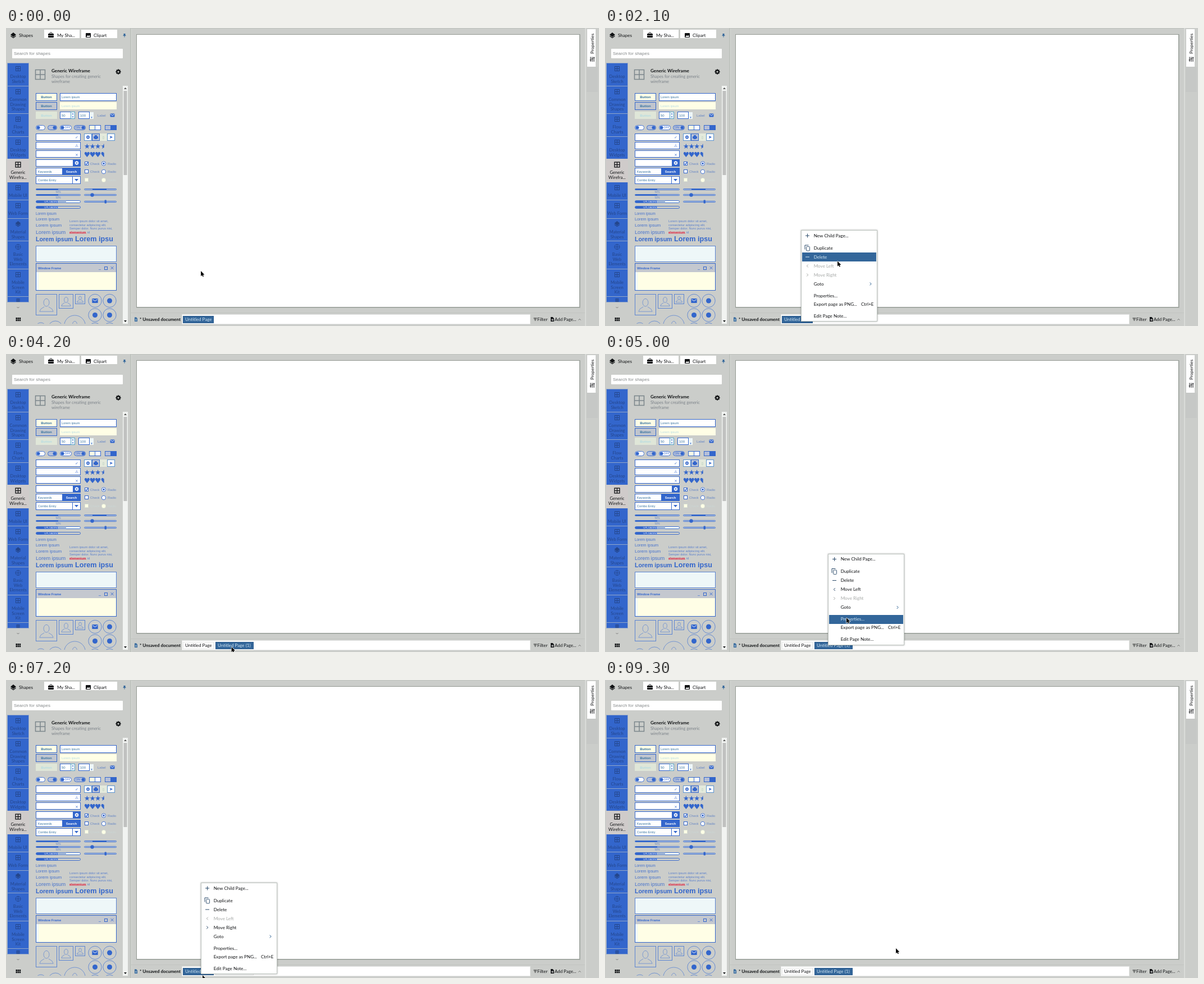
An HTML page with a canvas that plays this animation: 1056x531 px, repeating every 9.4 s.

```html
<!DOCTYPE html>
<html lang="en">
<head>
<meta charset="utf-8">
<title>Page tabs</title>
<style>
  html, body { margin: 0; width: 100%; height: 100%; overflow: hidden; background: #cbcdca; }
  canvas { display: block; }
</style>
</head>
<body>
<canvas id="stage" width="1056" height="531"></canvas>
<script>
const LOOP = 9400;
const BLUE = '#3366cc', SOFT = '#5b84d2', TEAL = '#34719f', DARK = '#24468c', STEEL = '#33669a';
const INK = '#101214', GRAY = '#cbcdca', CREAM = '#fffee6', MIST = '#eef7f8', PALE = '#b4dbe2', WHITE = '#fff';
const UI = 'Lato, sans-serif', ARIAL = '"Liberation Sans", sans-serif', SYMBOL = '"DejaVu Sans", sans-serif';

const screen = document.getElementById('stage').getContext('2d');
const backdrop = document.createElement('canvas');
backdrop.width = 1056;
backdrop.height = 531;
let ctx = screen;

// ---------- drawing helpers ----------
function rect(x, y, w, h, fill, stroke) {
  if (fill) { ctx.fillStyle = fill; ctx.fillRect(x, y, w, h); }
  if (stroke) { ctx.lineWidth = 1; ctx.strokeStyle = stroke; ctx.strokeRect(x + .5, y + .5, w - 1, h - 1); }
}
function round(x, y, w, h, r, fill, stroke, width = .9) {
  ctx.beginPath();
  ctx.roundRect(x, y, w, h, r);
  if (fill) { ctx.fillStyle = fill; ctx.fill(); }
  if (stroke) { ctx.lineWidth = width; ctx.strokeStyle = stroke; ctx.stroke(); }
}
function circle(x, y, r, fill, stroke, width) { round(x - r, y - r, 2 * r, 2 * r, r, fill, stroke, width); }
function line(color, width, ...points) {
  ctx.beginPath();
  for (let i = 0; i < points.length; i += 2) ctx.lineTo(points[i], points[i + 1]);
  ctx.strokeStyle = color;
  ctx.lineWidth = width;
  ctx.stroke();
}
function shape(fill, ...points) {
  ctx.beginPath();
  for (let i = 0; i < points.length; i += 2) ctx.lineTo(points[i], points[i + 1]);
  ctx.closePath();
  ctx.fillStyle = fill;
  ctx.fill();
}
function text(s, x, y, size, color = INK, family = UI, align = 'left', weight = '') {
  ctx.font = `${weight} ${size}px ${family}`;
  ctx.textAlign = align;
  ctx.fillStyle = color;
  ctx.fillText(s, x, y + size * .35);
}
const arial = (s, x, y, size = 5.6, color = TEAL, weight = '', align = 'left') =>
  text(s, x, y, size, color, ARIAL, align, weight);
const symbol = (s, x, y, size, color = BLUE) => text(s, x, y, size, color, SYMBOL, 'center');

// ---------- icons ----------
function gridIcon(x, y, size, color, width = 1) {
  const h = size / 2;
  ctx.strokeStyle = color;
  ctx.lineWidth = width;
  ctx.strokeRect(x - h, y - h, size, size);
  line(color, width, x, y - h, x, y + h);
  line(color, width, x - h, y, x + h, y);
}
function layersIcon(x, y, color) {
  shape(color, x, y - 5, x + 5, y - 1, x, y + 3, x - 5, y - 1);
  line(color, 1.2, x - 4.5, y + 1.2, x, y + 4.6, x + 4.5, y + 1.2);
}
function gearIcon(x, y, r, color, hole = WHITE) {
  for (let i = 0; i < 4; i++) {
    const a = i * Math.PI / 4, dx = Math.cos(a) * r, dy = Math.sin(a) * r;
    line(color, r * .45, x - dx, y - dy, x + dx, y + dy);
  }
  circle(x, y, r * .75, color);
  circle(x, y, r * .35, hole);
}
function mailIcon(x, y, w) {
  const h = w * .75;
  round(x - w / 2, y - h / 2, w, h, 1, BLUE);
  line(WHITE, .9, x - w * .4, y - h * .3, x, y + h * .05, x + w * .4, y - h * .3);
}
function person(x, y, size) {
  const at = (...p) => p.map((v, i) => v * size + (i % 2 ? y : x));
  ctx.lineWidth = .7;
  ctx.strokeStyle = SOFT;
  ctx.beginPath();
  ctx.ellipse(x, y - size * .1, size * .13, size * .18, 0, 0, 7);
  ctx.stroke();
  line(SOFT, .7, ...at(-.1, .1, -.26, .2, -.32, .32, .32, .32, .26, .2, .1, .1));
}

// ---------- static window ----------
function drawTopTabs() {
  layersIcon(13, 13, INK);
  text('Shapes', 23, 13, 8);
  rect(68, 3, 63, 15, WHITE);
  round(75, 10, 10, 7, 1, INK);
  round(78, 8, 4, 3, 1, null, INK);
  line(WHITE, .7, 75, 13.5, 85, 13.5);
  text('My Sha...', 91, 13, 8);
  rect(134, 3, 64, 15, WHITE);
  round(142, 9, 9, 8, 1, INK);
  shape(WHITE, 143, 16, 145.5, 13, 147, 14.5, 148.5, 12.5, 150, 16);
  text('Clipart', 156, 13, 8);
  rect(209.5, 10, 3, 4, STEEL);
  line(STEEL, 1, 208.5, 13.5, 213.5, 13.5);
  line(STEEL, 1, 211, 13, 211, 16.5);
  round(11, 37, 197, 17, 1, WHITE);
  arial('Search for shapes', 14, 45, 8, '#85898a');
}

function drawCategories() {
  const categories = [
    [63, 40, 'Desktop', 'Sketch'], [104, 48, 'Common', 'Drawing', 'Shapes'],
    [153, 40, 'Flow', 'Charts'], [194, 39, 'Desktop', 'Widgets'],
    [234, 40, 'Generic', 'Wirefra...'], [275, 31, 'Mobile UI'], [307, 32, 'Web Form'],
    [340, 39, 'Material', 'Shapes'], [380, 49, 'Basic', 'Web', 'Elements'],
    [430, 48, 'Mobile', 'Screen', 'Kit'], [479, 9]
  ];
  rect(2, 62, 39, 427, '#93a7c9');
  categories.forEach(([y, h, ...lines], i) => {
    const active = i === 4, color = active ? INK : DARK;
    if (active) rect(2, y - 1, 39, h + 2, '#cfcbca');
    else rect(3, y, 37, h, BLUE);
    if (i === 7) layersIcon(21.5, y + 9, color);
    else if (i === 8) {
      circle(21.5, y + 10, 4.5, null, color);
      line(color, .8, 17, y + 10, 26, y + 10);
      line(color, .8, 21.5, y + 5.5, 21.5, y + 14.5);
    } else if (lines.length) gridIcon(21.5, y + 9.5, active ? 9 : 8, color, active ? 1.3 : 1);
    else gridIcon(21.5, y + 6, 5, color);
    lines.forEach((s, n) => text(s, 21.5, y + 23.3 + n * 8.6, 7.6, color, UI, 'center'));
  });
  line('#666', .8, 19.5, 497, 21.5, 499, 23.5, 497);
  for (let i = 0; i < 6; i++) rect(17.5 + i % 3 * 3.1, 516 + (i / 3 | 0) * 3.4, 2.5, 2.8, INK);
}

function drawHeader() {
  gridIcon(61, 83, 17, '#7b868b', 1.5);
  text('Generic Wireframe', 81, 76, 8.1, INK, UI, 'left', 'bold');
  text('Shapes for creating generic', 81, 86, 7.4, '#7b8188');
  text('wireframe', 81, 95, 7.4, '#7b8188');
  gearIcon(200, 78, 4.6, INK, GRAY);
  rect(208, 103, 9, 424, '#f1f3f1');
  rect(209.5, 112, 6, 150, '#c0c1c0');
  shape('#555', 210, 109, 212.5, 106, 215, 109);
  shape(INK, 210, 521, 212.5, 524, 215, 521);
}

function drawFields() {
  rect(53, 116, 38, 14, CREAM, BLUE);
  rect(53, 132, 38, 14, '#c0c5ce', BLUE);
  rect(53, 149, 38, 13, '#dfe6d8');
  [TEAL, TEAL, PALE].forEach((c, i) => arial('Button', 72, 123 + i * 16.2, 6.1, c, 'bold', 'center'));
  rect(96, 116, 101, 14, WHITE, BLUE);
  arial('Lorem ipsum', 99, 123, 5.6);
  rect(96, 132, 101, 13, CREAM);
  arial('Lorem ipsum', 99, 139, 5.6, PALE);
  rect(96, 149, 27, 13, WHITE, BLUE);
  rect(115, 149, 8, 13, MIST, '#58a2c8');
  symbol('▴', 119, 152.5, 5);
  symbol('▾', 119, 158, 5);
  arial('50', 99, 155.5, 6);
  rect(129, 149, 20, 13, WHITE, BLUE);
  rect(149, 150, 7, 12, MIST);
  symbol('▾', 152.5, 159, 5);
  arial('100', 132, 155.5, 6);
  arial('Label', 163, 155.5, 6, '#6485c4');
  mailIcon(189.5, 155.5, 8);

  const toggle = (x, w, on, label) => {
    round(x + .5, 173.5, w, 8, 4, on ? '#b4bfd9' : WHITE, BLUE);
    circle(on ? x + w - 3.5 : x + 4.5, 177.5, 3, BLUE);
    if (label) arial(label, x + w / 2 + (on ? -3 : 3.5), 177.5, 5, BLUE, '', 'center');
  };
  toggle(53, 16, false);
  toggle(74, 16, true);
  toggle(96, 20, false, 'OFF');
  toggle(121, 20, true, 'ON');
  rect(148, 173, 21, 9, WHITE, BLUE);
  rect(148, 173, 11, 9, CREAM, BLUE);
  rect(176, 173, 21, 9, '#b4bfd9', BLUE);
  rect(186, 173, 11, 9, BLUE);

  ['✓', '⚠', '×'].forEach((mark, i) => {
    rect(53, 188 + i * 15.4 | 0, 80, 13, WHITE, BLUE);
    symbol(mark, 126, 194.5 + i * 15.4, 6.5);
  });
  rect(53, 234, 80, 13, WHITE, BLUE);
  rect(119, 234, 14, 13, BLUE);
  gearIcon(126, 240.5, 3.4, WHITE, BLUE);
  rect(53, 249, 80, 13, WHITE, BLUE);
  rect(100, 249, 33, 13, BLUE);
  arial('Keywords', 57, 256);
  arial('Search', 116.5, 256, 5.8, WHITE, 'bold', 'center');
  rect(53, 264, 80, 14, WHITE, BLUE);
  rect(118, 264, 1, 14, BLUE);
  shape(BLUE, 122, 269, 129, 269, 125.5, 273);
  arial('Combo Entry', 57, 271);

  rect(139, 188, 14, 13, WHITE, '#5b93cf');
  rect(153, 188, 14, 13, '#b8c2d6', BLUE);
  rect(167, 188, 13, 13, '#e4eadc');
  rect(180, 188, 14, 13, WHITE, '#5b93cf');
  gearIcon(146, 194.5, 3.2, BLUE);
  round(156, 193, 8, 4, 1, BLUE);
  rect(158, 191, 4, 7, BLUE);
  symbol('▯', 173.5, 194.5, 6, '#9bbbad');
  symbol('➤', 187, 194.5, 8);
  ['★', '♥'].forEach((mark, row) => {
    const y = 210.5 + row * 15.5;
    for (let i = 0; i < 3; i++) symbol(mark, 144.3 + i * 9.7, y, 12.5);
    ctx.save();
    ctx.beginPath();
    ctx.rect(168, y - 8, 6.7, 16);
    ctx.clip();
    symbol(mark, 174, y, 12.5);
    ctx.restore();
  });
  [241.5, 256, 271].forEach((y, i) => {
    const off = i === 2;
    rect(140, Math.floor(y - 3.5), 7, 7, off ? CREAM : WHITE, off ? '#dbe3d4' : BLUE);
    circle(174, y, 3.7, off ? CREAM : WHITE, off ? '#dbe3d4' : BLUE);
    arial('Check', 150, y, 5.8, off ? '#cbd6d4' : '#6485c4');
    arial('Radio', 181, y, 5.8, off ? '#cbd6d4' : '#6485c4');
  });
  line(BLUE, 1.2, 141.5, 241.5, 143, 243.2, 146, 239.5);
  circle(174, 241.5, 1.8, BLUE);
}

function drawSliders() {
  const bar = (x, y, w, h, part, back = '#c7d4e6') => {
    round(x + .5, y - h / 2, w, h, h / 2, back, BLUE);
    round(x + .5, y - h / 2, w * part, h, h / 2, BLUE);
  };
  bar(53, 287.5, 79, 2, .5);
  bar(53, 297.5, 79, 2, .5);
  arial('50%', 93, 292.5, 4.5, '#6485c4', '', 'center');
  arial('50%', 93, 302.5, 4.5, '#6485c4', '', 'center');
  bar(53, 309.5, 79, 4, .5, MIST);
  bar(53, 319.5, 79, 4, .5, GRAY);
  rect(93, 307.5, 14, 4, '#9fb6d9');
  arial('UPLOADING', 81, 309.7, 4.3, WHITE, '', 'center');
  arial('UPLOADING', 81, 319.7, 4.3, WHITE, '', 'center');
  bar(139, 287.5, 57, 2, 0);
  rect(154, 286.5, 25, 2, BLUE);
  bar(139, 297.5, 57, 2, 0);
  circle(153.5, 297.5, 3.2, BLUE);
  bar(139, 309.5, 57, 2, 0);
  round(175.5, 306.5, 3.5, 6, 1, BLUE);
}

function drawTexts() {
  [[330.5, 6.4], [340.5, 7.3], [351, 8], [364, 9.2]].forEach(([y, size]) => arial('Lorem ipsum', 53, y, size, '#4672cc'));
  arial('Lorem ipsum', 53, 376.5, 10.6, BLUE, 'bold');
  arial('Lorem ipsu', 123, 376, 12.6, BLUE, 'bold');
  ['Lorem ipsum dolor sit amet,', 'consectetur adipiscing elit.', 'Semper dolor. Nunc purus nisi,']
    .forEach((s, i) => arial(s, 113, 344.5 + i * 6.4, 5.6, '#5a7fcb'));
  arial('elementum', 113, 363.7, 5.6, '#e0223c', 'bold');
  line('#e0223c', .5, 113, 366, 143, 366);
  arial('id', 145, 363.7, 5.6, '#5a7fcb');
}

function drawFrames() {
  rect(53, 388, 144, 29, MIST, SOFT);
  rect(53, 419, 144, 49, '#c4c8cf', BLUE);
  rect(54, 435, 142, 32, CREAM);
  rect(54, 435, 4, 32, MIST);
  arial('Window Frame', 57, 427.5, 5.8, BLUE, 'bold');
  line(SOFT, .8, 165, 430.5, 169, 430.5);
  rect(175, 425, 6, 6, null, BLUE);
  line(BLUE, .9, 186.5, 425, 191.5, 430);
  line(BLUE, .9, 191.5, 425, 186.5, 430);

  ctx.save();
  ctx.beginPath();
  ctx.rect(44, 470, 164, 57);
  ctx.clip();
  [[53, 38], [94, 26], [123, 18]].forEach(([x, size]) => {
    rect(x, 474, size, size, null, SOFT);
    person(x + size / 2, 474 + size / 2, size);
  });
  [[122.5, 531, 19], [88, 535, 13], [62, 534, 9]].forEach(([x, y, r]) => {
    circle(x, y, r, null, SOFT, .8);
    person(x, y, r * 1.6);
  });
  [[158.5, 486], [184.5, 486], [158.5, 511.5], [184.5, 511.5]].forEach(([x, y], i) => {
    circle(x, y, 11.7, null, SOFT);
    if (i) circle(x, y, 4.5, BLUE);
    else mailIcon(x, y, 10.5);
  });
  [158.5, 184.5].forEach(x => circle(x, 537, 11.7, null, SOFT));
  ctx.restore();
}

function drawWorkspace() {
  rect(221, 0, 2, 531, '#bfc3be');
  rect(223, 0, 1, 531, '#d5d8d4');
  rect(1031, 0, 2, 531, '#d9dbd8');
  rect(223, 0, 808, 1, '#bfc3be');
  rect(232, 11, 791, 488, '#b3b8b3');
  rect(232, 11, 790, 487, WHITE, '#929892');
  rect(223, 507, 808, 1, '#c2c5c1');
  rect(1034, 69, 20, 45, '#c6c8c6');
  rect(1035, 2, 15, 67, WHITE);
  ctx.save();
  ctx.translate(1044, 46);
  ctx.rotate(-Math.PI / 2);
  text('Properties', 0, 0, 8);
  [-3, 0, 3].forEach((y, i) => {
    line(INK, 1, -14, y, -5.5, y);
    line(INK, 1, -11 + i * 2, y - 1.3, -11 + i * 2, y + 1.3);
  });
  ctx.restore();

  rect(313, 510, 621, 18, WHITE, '#e2e4e2');
  shape(STEEL, 229, 515.5, 232, 515.5, 234, 517.5, 234, 523, 229, 523);
  line(WHITE, .7, 230, 519, 233, 519);
  line(WHITE, .7, 230, 521, 233, 521);
  text('* Unsaved document', 238, 519, 7.9, INK, UI, 'left', 'bold');
  [3, 2, 1].forEach((w, i) => line(INK, .9, 942.5 - w, 517 + i * 2, 942.5 + w, 517 + i * 2));
  text('Filter', 946, 519, 8);
  shape(INK, 970, 515, 973.5, 515, 975.8, 517.5, 975.8, 523, 970, 523);
  line(WHITE, .8, 973, 518, 973, 522);
  line(WHITE, .8, 971, 520, 975, 520);
  text('Add Page...', 977, 519, 7.9);
  line('#555', .8, 1019.5, 520.5, 1021.5, 518.5, 1023.5, 520.5);
}

function drawBackdrop() {
  ctx = backdrop.getContext('2d');
  rect(0, 0, 1056, 531, GRAY);
  [drawTopTabs, drawCategories, drawHeader, drawFields, drawSliders, drawTexts, drawFrames, drawWorkspace]
    .forEach(draw => draw());
  ctx = screen;
}

// ---------- timeline ----------
const PATH = [ // time, x, y of the pointer tip
  [0, 347, 433], [300, 347, 433], [850, 352, 525], [1200, 352, 525], [2000, 414, 415.5], [2200, 414, 415.5],
  [2500, 412, 393], [2900, 412, 393], [3900, 402, 522], [4600, 401, 522], [5200, 440, 452], [5400, 450, 452],
  [5850, 545, 456], [6150, 545, 456], [6800, 350, 526], [7300, 350, 526], [7950, 390, 458], [8200, 400, 458],
  [8600, 490, 459], [8950, 518, 478], [LOOP, 518, 478]
];
const MENUS = [
  { from: 900, to: 2800, x: 349, y: 360, disabled: [3, 4] },
  { from: 4500, to: 6100, x: 397, y: 355.5, disabled: [4] },
  { from: 7000, to: 9150, x: 347, y: 361, disabled: [3] }
];
const ROWS = [
  [10, 'New Child Page...'], [32, 'Duplicate'], [48, 'Delete'], [64, 'Move Left'], [80, 'Move Right'],
  [96, 'Goto'], [117, 'Properties...'], [132, 'Export page as PNG...'], [153, 'Edit Page Note...']
];
const GOTO = 5;
const PAGES = [['Untitled Page', 315, 55], ['Untitled Page (1)', 373, 68]];

function pointerAt(t) {
  const i = Math.max(1, PATH.findIndex(key => key[0] > t));
  const [t0, x0, y0] = PATH[i - 1], [t1, x1, y1] = PATH[i];
  const u = (t - t0) / (t1 - t0), k = u * u * (3 - 2 * u);
  return { x: x0 + (x1 - x0) * k, y: y0 + (y1 - y0) * k };
}

function drawPages(t) {
  const count = t < 2900 ? 1 : 2;
  const active = t < 2900 || t >= 6100 && t < 9150 ? 0 : 1;
  PAGES.slice(0, count).forEach(([label, x, w], i) => {
    rect(x, 513, w, 13, i === active ? STEEL : WHITE, i === active ? '#2a5a8c' : '#e4e6e4');
    text(label, x + 4, 519.3, 8, i === active ? '#d6e9f5' : INK);
  });
}

function panel(x, y, w, h) {
  const top = Math.round(y);
  ctx.save();
  ctx.shadowColor = 'rgba(0,0,0,.3)';
  ctx.shadowBlur = 3;
  rect(x, top, w, h, WHITE);
  ctx.restore();
  rect(x, top, w, h, null, '#bcc3be');
}

function rowIcon(i, x, y, color) {
  if (i === 0) line(color, 1, x, y - 3.5, x, y + 3.5);
  if (i === 0 || i === 2) line(color, 1, x - 3.5, y, x + 3.5, y);
  if (i === 1) {
    round(x - 2, y - 2.5, 6, 7.5, 1, null, color);
    line(color, 1, x - 4.5, y + 2.5, x - 4.5, y - 5, x + 2, y - 5);
  }
  if (i === 3) line(color, 1, x + 1.3, y - 2.5, x - 1.2, y, x + 1.3, y + 2.5);
  if (i === 4) line(color, 1, x - 1.3, y - 2.5, x + 1.2, y, x - 1.3, y + 2.5);
}

function drawMenu({ x, y, disabled }, tip) {
  const subX = x + 131, subY = y + 88.5;
  const inside = (left, top, w, h) => tip.x >= left && tip.x <= left + w && tip.y >= top && tip.y <= top + h;
  const overRow = inside(x, y, 136, 163)
    ? ROWS.findIndex(([dy], i) => Math.abs(tip.y - y - dy) <= 8 && !disabled.includes(i)) : -1;
  const hover = inside(subX, subY, 72, 34) ? GOTO : overRow;

  panel(x, y, 136, 163);
  ROWS.forEach(([dy, label], i) => {
    const cy = y + dy, lit = i === hover;
    const color = lit ? '#d6e9f5' : disabled.includes(i) ? '#a5a8a6' : INK;
    if (lit) rect(x + 2, Math.round(cy - 8), 132, 16, STEEL);
    rowIcon(i, x + 11.5, cy, color === INK ? '#2b4a6a' : color);
    text(label, x + 22.7, cy, 8.1, color);
    if (i === GOTO) rowIcon(4, x + 124, cy, lit ? color : '#2b5f91');
    if (i === 7) text('Ctrl+E', x + 129.5, cy, 8.1, color, UI, 'right');
  });

  if (hover !== GOTO) return;
  panel(subX, subY, 72, 34);
  PAGES.forEach(([label], i) => {
    const cy = subY + 9 + i * 15, lit = inside(subX, cy - 7.5, 72, 15);
    if (lit) rect(subX + 2, Math.round(cy - 7.5), 68, 15, STEEL);
    text(label, subX + 6, cy, 8, lit ? '#d6e9f5' : INK);
  });
}

function drawPointer({ x, y }) {
  const points = [0, 0, 0, 9.2, 2.1, 7.3, 3.5, 10.3, 5, 9.6, 3.6, 6.7, 6.4, 6.5].map((v, i) => v + (i % 2 ? y : x));
  line('rgba(255,255,255,.9)', 1.4, ...points, x, y);
  shape('#000', ...points);
}

function render(now) {
  const t = now % LOOP, tip = pointerAt(t);
  ctx.drawImage(backdrop, 0, 0);
  drawPages(t);
  MENUS.filter(menu => t >= menu.from && t < menu.to).forEach(menu => drawMenu(menu, tip));
  drawPointer(tip);
}

drawBackdrop();
const start = performance.now();
(function tick() {
  render(performance.now() - start);
  requestAnimationFrame(tick);
})();
</script>
</body>
</html>
```
